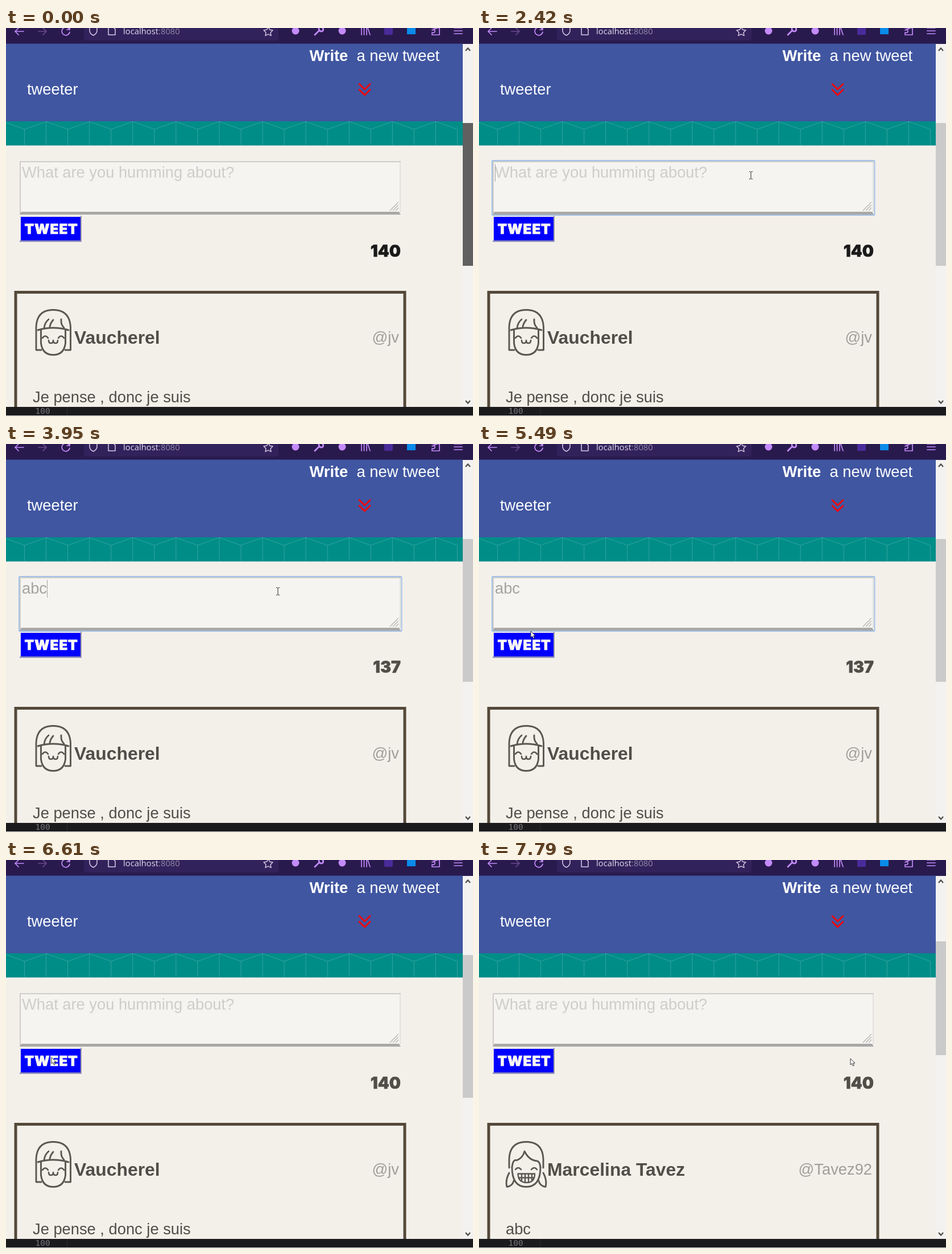
Write an HTML page that moves like this. It is 821 px wide and 682 px high and loops after 8 s.

```html
<!DOCTYPE html>
<html lang="en">
<head>
<meta charset="utf-8">
<title>Tweet form</title>
<style>
html, body { margin: 0; width: 100%; height: 100%; overflow: hidden; background: #f3f0ea; }
svg { display: block; width: 821px; height: 682px; }
text { font: 27.3px "Liberation Sans", Arial, sans-serif; white-space: pre; }
.bold { font-weight: 700; }
.name { font-size: 31.9px; font-weight: 700; fill: #514e47; }
.body { fill: #514e47; }
.handle { fill: #a09e9a; text-anchor: end; }
.heavy { font-family: Inter, sans-serif; font-weight: 900; }
.url { font: 14.8px "Open Sans", sans-serif; }
.code { font: 14.5px "DejaVu Sans Mono", monospace; }
.line { fill: none; stroke-linecap: round; stroke-linejoin: round; }
</style>
</head>
<body>
<svg viewBox="0 0 821 682">
  <rect width="821" height="682" fill="#f3f0ea"/>

  <!-- browser toolbar -->
  <rect width="821" height="28" fill="#291a4d"/>
  <path d="M137 0H479V17Q479 22 474 22H142Q137 22 137 17Z" fill="#32225b"/>
  <g class="line" stroke="#c48bfa" stroke-width="1.7">
    <path d="M31 6H16M22 0l-6 6 6 6"/>
    <path d="M57 6H71M65 0l6 6-6 6" stroke="#69498f"/>
    <path d="M111 2A7 7 0 1 0 112 7M112 -2V3H107"/>
    <path d="M147 0V4Q147 10 153.5 13Q160 10 160 4V0M180 -2V12H192V2L188 -2Z" stroke="#d6cce8" stroke-width="1.5"/>
    <path d="M461 -2l2.5 5 5.5 1-4 4 1 5.500-5-2.600-5 2.600 1-5.500-4-4 5.500-1Z" stroke="#d6cce8" stroke-width="1.4"/>
    <path d="M543 12l8-8M550 1q0 5 5 5q4-1 2-6" stroke-width="2.8"/>
    <path d="M625 -1V12M629.5 -1V12M634 -1V12M636 0l4 12"/>
    <path d="M749 0H754M758 0H762V12H749V8Q754 9 754 5.500T749 4Z"/>
    <path d="M788 0H802M788 5H802M788 10H802"/>
  </g>
  <circle cx="509" cy="5" r="6.5" fill="#c48bfa"/>
  <circle cx="591" cy="5" r="6.5" fill="#c48bfa"/>
  <rect x="665" y="-2" width="15" height="14" rx="2" fill="#4a2b9b"/>
  <rect x="705" y="-4" width="15" height="15" fill="#0a8cea"/>
  <text class="url" x="206" y="11" fill="#e4ddf1">localhost<tspan fill="#938aab">:8080</tspan></text>

  <!-- page header -->
  <rect y="27.5" width="803" height="137" fill="#4056a1"/>
  <text class="bold" x="533.5" y="58" fill="#fff">Write</text>
  <text x="616.5" y="58" fill="#fff">a new tweet</text>
  <text x="37" y="117" fill="#fff">tweeter</text>
  <path class="line" d="M621 98.5l9.5 9.300 9.500-9.300M621 108.500l9.500 9.300 9.500-9.300" stroke="#f00" stroke-width="2.8"/>
  <rect y="164" width="803" height="42.5" fill="#008d88"/>
  <path id="pattern" fill="none" stroke="#fff" stroke-opacity=".2"/>

  <!-- form -->
  <rect x="24" y="234" width="670" height="94" fill="#f5f4f1"/>
  <path d="M25 328V235H694" fill="none" stroke="#cfcecb" stroke-width="2"/>
  <path d="M693 236V324" stroke="#e2e1de" stroke-width="2"/>
  <path d="M24 328L27 323H691L694 328Z" fill="#a9a8a6"/>
  <path d="M675 321L690 306M680 321L690 311M685 321L690 316" stroke="#b4b3b0" stroke-width="1.2"/>
  <rect id="focus" x="23" y="233" width="672.5" height="96" rx="1.5" fill="none" stroke="#a4c1e6" stroke-width="2"/>
  <text id="entry" x="28" y="263"/>
  <path id="typo" class="line" stroke="#f08a8a" stroke-width="1.3"/>
  <rect id="caret" y="239" width="1" height="31" fill="#a3a2a0"/>

  <rect x="24" y="330" width="109" height="45.5" fill="#00f"/>
  <path id="bevelA" d="M25 375V331H133" fill="none" stroke-width="2"/>
  <path id="bevelB" d="M24 374.5H132V330" fill="none" stroke-width="2"/>
  <text id="label" class="heavy" x="79.5" y="361.5" text-anchor="middle" style="font-size:24.5px;letter-spacing:.8px" fill="#fbfaf6" stroke="#fbfaf6" stroke-width=".7">TWEET</text>
  <text id="count" class="heavy" x="694" y="402" text-anchor="end" style="font-size:28.5px" stroke-width=".5"/>

  <!-- tweet card -->
  <rect x="17" y="464.5" width="684" height="230" fill="none" stroke="#54493a" stroke-width="5"/>
  <g id="bob" class="line" stroke="#5a5750" stroke-width="2.9">
    <path d="M62 566H53V526Q54 495.5 83 495.5Q112 495.5 113.5 526V566H104"/>
    <path d="M61.5 531V554Q64 574.5 83 574.5Q102 574.5 104.5 554V531M56 531Q83 523 110 531"/>
    <path d="M75 512Q68 518 67 527M83 513Q78 519 77 525M97 512Q96 521 102 527"/>
    <path d="M64 545q5-7 10 0M92 545q5-7 10 0M75 549q0 5 4 5t4-5q0 5 4 5t4-5" stroke-width="2.6"/>
  </g>
  <g id="braids" class="line" stroke="#5a5750" stroke-width="2.9">
    <path d="M53 541V526Q54 495.5 83 495.5Q112 495.5 113 526V541"/>
    <path d="M58 540Q60 525 66 528Q77 524 80 512Q88 528 102 529Q107 530 108 540"/>
    <path d="M58 540Q58 574.5 83 574.5Q108 574.5 108 540"/>
    <path d="M53 550Q46 563 49 574.5Q59 573 61 564M113 550Q120 563 117 574.500Q107 573 105 564"/>
    <path d="M64 544q5-6 10 0M92 544q5-6 10 0" stroke-width="2.6"/>
    <path d="M68.500 551.500H98Q98 567 83.500 567T68.500 551.500ZM70 558.500H97M75 552V564M81 552V566M87 552V566M93 552V563" stroke-width="2.4"/>
  </g>
  <text id="author" class="name" y="555"/>
  <text id="handle" class="handle" x="691" y="553"/>
  <text id="message" class="body" x="47" y="658"/>

  <!-- scrollbar and editor strip -->
  <rect x="803" y="28" width="18" height="638" fill="#f3f2f1"/>
  <rect id="thumb" x="803" width="18"/>
  <path d="M808 40l4-4.500 4 4.500M808 655l4 4.500 4-4.500" fill="none" stroke="#4d4b48" stroke-width="2.2"/>
  <rect y="666" width="821" height="15" fill="#1b1a1d"/>
  <rect y="681" width="821" height="1" fill="#d4d3d2"/>
  <path d="M107.5 666V681" stroke="#2c2b2e"/>
  <text class="code" x="51.5" y="678" fill="#75757a">100</text>

  <path id="beam" d="M-3 -6.500H-1L0 -5.500 1 -6.500H3M0 -5.500V5.500M-3 6.500H-1L0 5.500 1 6.500H3" fill="none" stroke="#222"/>
  <path id="arrow" d="M0 0V11L2.600 8.700 4.500 13 6.400 12 4.600 8H8Z" fill="#fff" stroke="#222" stroke-width=".9"/>
</svg>
<script>
const LOOP = 8000;
const el = id => document.getElementById(id);
const show = (id, on) => el(id).style.display = on ? "" : "none";
const set = (id, attrs) => {
  for (const key in attrs) el(id).setAttribute(key, attrs[key]);
};
const within = (t, from, to) => t >= from && t < to;

// Valleys and peaks alternate, each with a vertical seam below.
let zigzag = "M-6 164";
for (let i = 0; i < 21; i++) {
  const x = 32.5 + i * 38.05, y = i % 2 ? 164.5 : 178;
  zigzag += `L${x} ${y}V206M${x} ${y}`;
}
set("pattern", { d: zigzag });

let wave = "M28 268";
for (let i = 0; i < 14; i++) wave += `l3 ${i % 2 ? 2.5 : -2.5}`;
set("typo", { d: wave, fill: "none" });

// time, pointer shape, x, y
const pointer = [
  [840, "beam", 622, 235], [960, "beam", 523, 229],
  [1110, "beam", 496, 248], [1270, "beam", 478, 259],
  [4620, "beam", 348, 297], [4760, "arrow", 165, 340],
  [4890, "arrow", 92, 330], [5040, "arrow", 91, 329],
  [5620, "arrow", 80, 347], [7500, "arrow", 86, 347],
  [7650, "arrow", 370, 343], [7790, "arrow", 653, 349]
];
const typing = [[3510, "a"], [3790, "ab"], [3950, "abc"], [6610, ""]];
const caretX = [28, 43, 57.5, 72];
const caretOn = [[2420, 2830], [3390, 4500], [5040, 5490]];
const latest = (list, t) => list.filter(step => step[0] <= t).pop();

function draw(t) {
  const typed = (latest(typing, t) || [0, ""])[1];
  el("entry").textContent = typed || "What are you humming about?";
  set("entry", { fill: typed ? "#a5a4a2" : "#cfcdca" });
  show("focus", within(t, 2420, 5900));
  show("caret", caretOn.some(span => within(t, ...span)));
  set("caret", { x: caretX[typed.length] });
  show("typo", within(t, 5900, 6610));

  const ink = t < 3510 ? "#1a1a1a" : "#514e47";
  el("count").textContent = 140 - typed.length;
  set("count", { fill: ink, stroke: ink });

  const pressed = within(t, 5900, 6200), light = "#e9e7ea", dark = "#a09eaa";
  set("bevelA", { stroke: pressed ? dark : light });
  set("bevelB", { stroke: pressed ? light : dark });
  set("label", { transform: pressed ? "translate(1 1)" : "" });

  const posted = t >= 6900, loaded = t >= 7180;
  show("bob", !posted);
  show("braids", loaded);
  el("author").textContent = posted ? "Marcelina Tavez" : "Vaucherel";
  set("author", { x: posted && !loaded ? 47 : 120 });
  el("handle").textContent = posted ? "@Tavez92" : "@jv";
  el("message").textContent = posted ? "abc" : "Je pense , donc je suis";
  set("thumb", {
    y: posted ? 143 : 167,
    height: posted ? 200 : 251,
    fill: t < 590 ? "#606060" : "#cbcaca"
  });

  const [, shape, x, y] = latest(pointer, t) || [];
  for (const id of ["beam", "arrow"]) {
    show(id, id === shape);
    if (id === shape) set(id, { transform: `translate(${x} ${y})` });
  }
}

const start = performance.now();
function frame() {
  draw((performance.now() - start) % LOOP);
  requestAnimationFrame(frame);
}
frame();
</script>
</body>
</html>
```
